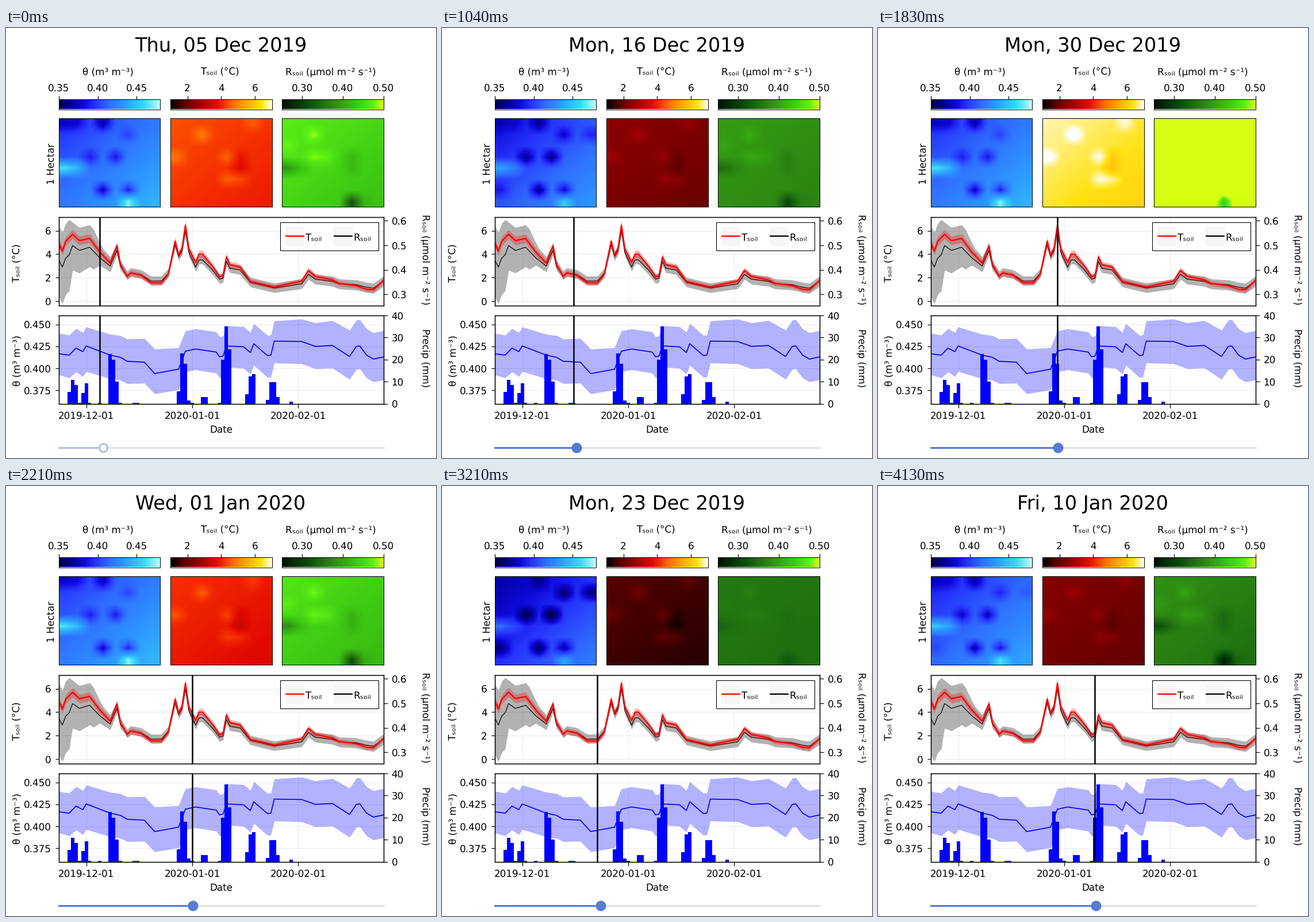
A matplotlib script for the animation above (4180 ms loop, 748 px wide and 748 px high).

```python
import numpy as np
import matplotlib.pyplot as plt
from matplotlib.animation import FuncAnimation
from matplotlib.colors import LinearSegmentedColormap
from matplotlib.dates import date2num, num2date

SIZE, DPI = 748, 68
FRAMES, LOOP_MS = 100, 4180
PT = 72 / DPI                      # points per pixel
FONT, TITLE_FONT = 16.8 * PT, 33.6 * PT
START = date2num(np.datetime64("2019-11-23"))
DAYS = np.arange(96)
T_SOIL, R_SOIL = "Tₛₒᵢₗ", "Rₛₒᵢₗ"
THETA_UNIT, R_UNIT = "θ (m³ m⁻³)", " (μmol m⁻² s⁻¹)"

plt.rcParams.update({
    "font.family": "DejaVu Sans", "font.size": FONT,
    "axes.linewidth": 1.3 * PT, "text.hinting": "none",
})


# ---- daily series, straight between turning points ----------------------
def path(*points):
    return np.interp(DAYS, *zip(*points))


temp = path((0, 4.95), (1, 4.26), (2, 5.1), (4, 5.7), (6, 5.15), (9, 5.34),
            (12, 4.17), (15, 3.24), (17, 4.7), (18, 3.1), (20, 2.1), (21, 2.4),
            (24, 2.2), (27, 1.55), (30, 1.55), (32, 2.3), (34, 5.1), (35, 3.92),
            (36, 4.46), (37, 6.47), (38, 4.46), (40, 3.3), (41, 4), (42, 4),
            (45, 2.94), (47, 2.06), (48, 2.16), (49, 3.77), (50, 3.1), (53, 2.9),
            (56, 1.67), (63, 1.2), (71, 1.7), (73, 2.62), (75, 2.1), (80, 1.8),
            (82, 1.5), (87, 1.3), (90, 1), (92, .96), (95, 1.76))
theta = path((0, 416.5), (3, 415), (5, 423), (7, 419), (8, 425.5), (15, 415),
             (18, 412.5), (20, 408), (25, 407), (28, 394), (35, 399),
             (37, 419.5), (40, 422), (46, 418.5), (47, 413), (48, 414),
             (49, 425.5), (54, 424.5), (56, 418), (57, 428), (61, 414.5),
             (62, 415), (63, 431), (71, 430.5), (75, 425), (80, 426),
             (85, 413.5), (87, 425), (88, 425.5), (90, 415), (92, 410.5),
             (95, 413)) / 1000

# respiration follows temperature, held back early and after each warm spell
resp = .292 + .0415 * temp - path((0, .058), (3, .055), (4, .03), (10, .02),
                                  (19, .004), (37, 0), (40, .018), (56, .012),
                                  (72, .02), (90, .004), (95, .01))
t_dev = .14 + .045 * temp
r_up = path((0, .14), (3, .143), (4, .095), (10, .09), (13, .047), (19, .02))
r_low = path((0, .15), (3, .147), (4, .1), (10, .075), (12, .03), (19, .015),
             (95, .022))
th_up = path((0, 23.5), (8, 21.6), (28, 28), (38, 23), (63, 23), (85, 30)) / 1000
th_low = path((0, 24), (8, 29), (28, 23), (85, 26)) / 1000

# rain spells in mm, keyed by first day
spells = {3: [5.3, 10.9, 8.5], 7: [4.8, 9.2], 15: [22.6, 20, 10],
          35: [5.6, 22.8, 18, 1.4], 42: [2.9, 2.9], 48: [20, 35, 24.6],
          55: [4.3, 12.4, 13.4], 61: [1.8, 9.8, 9.8, 3], 68: [.9]}
rain = np.zeros(len(DAYS))
rain[[6, 9, 12, 18, 22, 23, 39, 47]] = .3
for first, amounts in spells.items():
    rain[first:first + len(amounts)] = amounts

# ---- spatial deviations: diagonal slope plus local spots on 8 x 8 nodes --
ROW, COL = np.mgrid[:8, :8]
DIAGONAL = (ROW + COL) / 7 - 1     # -1 top left, 1 bottom right


def terrain(slope, spots):
    grid = slope * DIAGONAL
    for col, row, amount in spots:
        grid[row, col] += amount
    return grid


# column, row, amount on wet days, amount on dry days (thousandths)
PATCHES = [(0, 0, -18, 0), (1, 0, -17, 0), (3, 0, -34, -20), (5, 1, -15, -36),
           (7, 1, 0, -38), (2, 3, -25, -43), (4, 3, -34, -55), (0, 4, 54, 30),
           (1, 4, 33, 15), (0, 6, 0, -32), (3, 6, -51, -49), (5, 6, -44, -40),
           (5, 7, 35, 25)]
WET = terrain(24, [(c, r, w) for c, r, w, _ in PATCHES]) / 1000
DRY = terrain(24, [(c, r, d) for c, r, _, d in PATCHES]) / 1000
HEAT = terrain(-2.2, [(2, 1, 5), (6, 0, 3), (0, 3, 4), (4, 3, 4), (5, 4, -4),
                      (5, 3, -3), (4, 5, 4), (5, 5, 3)]) / 10
BREATH = terrain(-20, [(2, 1, 30), (0, 2, 15), (2, 3, 30), (3, 3, 25),
                       (5, 3, -25), (5, 4, -22), (0, 4, -68), (1, 4, -25),
                       (5, 7, -110), (6, 7, -15)]) / 1000


def fields(day):
    dry = np.clip((.419 - theta[day]) / .022, 0, 1)
    return (theta[day] + WET * (1 - dry) + DRY * dry,
            temp[day] + HEAT * (.7 + .1 * temp[day]),
            resp[day] + BREATH * (1 - .75 * dry))


# ---- colour maps --------------------------------------------------------
def ramp(name, *stops):
    return LinearSegmentedColormap.from_list(name, stops)


blues = ramp("blues", (0, "#00004c"), (.12, "#00008c"), (.25, "#0e08d7"),
             (.36, "#2634fc"), (.5, "#2f6eff"), (.65, "#2d9bff"),
             (.85, "#3cd8f8"), (1, "#befdf5"))
fire = ramp("fire", (0, "#000000"), (.125, "#580000"), (.25, "#8d0000"),
            (.45, "#e20a00"), (.52, "#f52d00"), (.62, "#ff7100"),
            (.75, "#ffaa00"), (.9, "#ffe314"), (1, "#ffffff"))
greens = ramp("greens", (0, "#001403"), (.25, "#094c0c"), (.5, "#2d8812"),
              (.75, "#3ecb14"), (.9, "#5cf214"), (1, "#d6ff12"))

# ---- figure -------------------------------------------------------------
fig = plt.figure(figsize=(SIZE / DPI, SIZE / DPI), dpi=DPI, facecolor="white")


def add_axes(x0, y0, x1, y1, **kw):
    return fig.add_axes([x0 / SIZE, 1 - y1 / SIZE,
                         (x1 - x0) / SIZE, (y1 - y0) / SIZE], **kw)


def ticks(axis, values, fmt="{}", pad=7):
    axis.set_ticks(values, [fmt.format(v) for v in values])
    axis.set_tick_params(length=6.5 * PT, width=1.2 * PT, pad=pad * PT)


def write(x, y, text, ha="center", rotation=0, size=FONT):
    return fig.text(x / SIZE, 1 - y / SIZE, text, ha=ha, va="baseline",
                    rotation=rotation, rotation_mode="anchor", size=size)


def heat_panel(x0, x1, cmap, lo, hi, marks, fmt):
    bar = add_axes(x0, 124, x1, 141.5)
    bar.imshow(np.linspace(0, 1, 256)[None], cmap=cmap, aspect="auto",
               extent=(lo, hi, 0, 1))
    bar.xaxis.tick_top()
    bar.set_yticks([])
    ticks(bar.xaxis, marks, fmt, pad=4)
    ax = add_axes(x0, 157, x1, 311, xticks=[], yticks=[])
    for spine in [*ax.spines.values(), *bar.spines.values()]:
        spine.set_linewidth(1 * PT)
    return ax.imshow(np.zeros((8, 8)), cmap=cmap, vmin=lo, vmax=hi,
                     aspect="auto", interpolation="bilinear")


def series_panel(y0, y1, left, right):
    ax = add_axes(92, y0, 657, y1, xlim=(0, 95), ylim=left)
    ax.set_xticks([8, 39, 70], [])
    ax.tick_params(axis="x", length=0)
    ax.grid(color="black", alpha=.08, lw=1 * PT)
    ax.set_axisbelow(True)
    twin = ax.twinx()
    twin.set_ylim(right)
    return ax, twin


def band(ax, y, low, up, color, width):
    ax.fill_between(DAYS, y - low, y + up, color=color, alpha=.3, lw=0)
    ax.plot(DAYS, y, color=color, lw=width * PT)


def day_line(ax):
    return ax.axvline(0, color="black", lw=2.5 * PT, zorder=10)


images = [heat_panel(92, 268, blues, .35, .48, [.35, .40, .45], "{:.2f}"),
          heat_panel(286, 463, fire, 1, 7, [2, 4, 6], "{}"),
          heat_panel(480, 656.5, greens, .25, .5, [.30, .40, .50], "{:.2f}")]

soil, soil_r = series_panel(329, 482.5, (-.37, 7.157), (.2556, .6143))
ticks(soil.yaxis, [0, 2, 4, 6])
ticks(soil_r.yaxis, [.3, .4, .5, .6])
band(soil_r, resp, r_low, r_up, "black", 1.2)
band(soil, temp, t_dev, t_dev, "red", 2.3)
soil.set_zorder(soil_r.get_zorder() + 1)
soil.patch.set_visible(False)

water, water_r = series_panel(500, 653.5, (.35975, .4602), (0, 40))
ticks(water.yaxis, [.375, .400, .425, .450], "{:.3f}")
ticks(water_r.yaxis, [0, 10, 20, 30, 40])
ticks(water.xaxis, [8, 39, 70])
water.set_xticklabels(["2019-12-01", "2020-01-01", "2020-02-01"])
band(water, theta, th_low, th_up, "blue", 1.7)
water_r.bar(DAYS, rain, width=1, color="blue", lw=0)

day_lines = [day_line(soil), day_line(water_r)]

title = write(373.5, 41.5, "", size=TITLE_FONT)
write(133, 82, THETA_UNIT, "left")
write(338, 82, T_SOIL + " (°C)", "left")
write(486.5, 82, R_SOIL + R_UNIT, "left")
write(83.5, 236, "1 Hectar", rotation=90)
write(25, 409, T_SOIL + " (°C)", rotation=90)
write(25, 579, THETA_UNIT, rotation=90)
write(724, 403, R_SOIL + R_UNIT, rotation=-90)
write(724, 574, "Precip (mm)", rotation=-90)
write(374, 704, "Date")

# legend and slider live in pixel coordinates
top = add_axes(0, 0, SIZE, SIZE, xlim=(0, SIZE), ylim=(SIZE, 0), zorder=20)
top.axis("off")


def rect(x0, y0, x1, y1, **kw):
    top.add_patch(plt.Rectangle((x0, y0), x1 - x0, y1 - y0, **kw))


rect(477.5, 338, 648, 387, fc="white", ec="black", lw=1.1 * PT)
for x, label, color in ((486, T_SOIL, "red"), (570, R_SOIL, "black")):
    rect(x, 346, x + 33, 379, fc="#f6f6f6", lw=0)
    top.plot([x, x + 33], [362, 362], color=color, lw=2.3 * PT,
             solid_capstyle="butt")
    top.text(x + 34, 369, label, va="baseline")

ACTIVE, DIMMED = "#4f7ad6", "#aec0e6"
TRACK_Y, FIRST, STEP = 730, 100, 5.78
top.plot([92, 657], [TRACK_Y] * 2, color="#e0e0e0", lw=3 * PT)
track, = top.plot([], [], lw=3 * PT)
knob, = top.plot([], [], "o")

# ---- motion: a hand drags the slider, slowing at each turn ---------------
GRAB_MS = 200
KEY_MS = np.array([0, GRAB_MS, 750, 1330, 1830, 2670, 3210, 4130])
KEY_X = np.array([169.4, 169.4, 191, 280, 313, 331.5, 276, 379])
rate = np.diff(KEY_X) / np.diff(KEY_MS)
slope = np.append(0, rate)         # the last key keeps its speed
for k, (a, b) in enumerate(zip(rate, rate[1:]), 1):
    slope[k] = 2 * a * b / (a + b) if a * b > 0 else 0


def knob_x(ms):
    ms = min(ms, KEY_MS[-1])
    k = max(np.searchsorted(KEY_MS, ms) - 1, 0)
    h = KEY_MS[k + 1] - KEY_MS[k]
    u = (ms - KEY_MS[k]) / h
    ease = u * u * (3 - 2 * u)
    return (KEY_X[k] * (1 - ease) + KEY_X[k + 1] * ease
            + h * u * (1 - u) * (slope[k] * (1 - u) - slope[k + 1] * u))


def update(i):
    ms = (i + 1) * LOOP_MS / FRAMES
    x = knob_x(ms)
    day = int(round((x - FIRST) / STEP))
    title.set_text(num2date(START + day).strftime("%a, %d %b %Y"))
    for image, field in zip(images, fields(day)):
        image.set_data(field)
    for line in day_lines:
        line.set_xdata([day, day])

    held = ms > GRAB_MS
    color = ACTIVE if held else DIMMED
    track.set_data([92, x], [TRACK_Y] * 2)
    track.set_color(color)
    knob.set_data([x], [TRACK_Y])
    knob.set(markeredgecolor=color, markerfacecolor="#587dd0" if held else "white",
             markersize=(16 if held else 14) * PT,
             markeredgewidth=(2 if held else 3) * PT)
    return [title, track, knob, *images, *day_lines]


anim = FuncAnimation(fig, update, frames=FRAMES, interval=LOOP_MS / FRAMES,
                     repeat=True, repeat_delay=0, blit=False)
plt.show()
```
